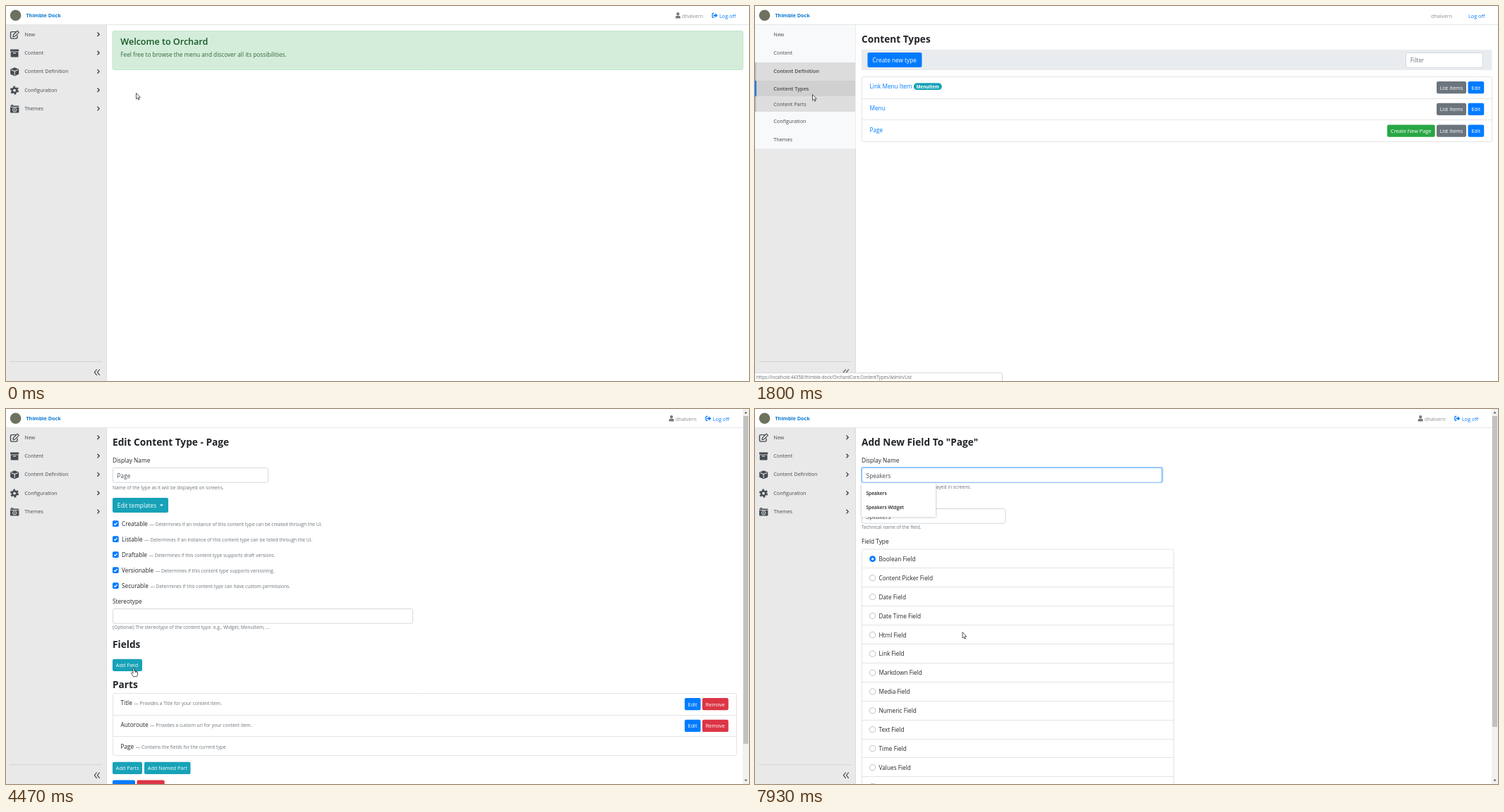
These frames come from a looping animation (1053x532 px, 8 s). An HTML page with a canvas:

```html
<!DOCTYPE html>
<html lang="en">
<head>
<meta charset="utf-8">
<title>Adding a field to a content type</title>
<style>
html, body { margin: 0; width: 100%; height: 100%; overflow: hidden; background: #fff; }
canvas { display: block; }
</style>
</head>
<body>
<canvas id="stage" width="1053" height="532"></canvas>
<script>
const c = document.getElementById('stage').getContext('2d');
const TICKS = 120, RATE = 15;            // the screen updates 15 times a second
const BODY = 8.28, SMALL = 7.28, HINT = 6.65;
const INK = '#212529', MUTED = '#6c757d', BLUE = '#007bff', TEAL = '#17a2b8',
  RED = '#dc3545', GREEN = '#28a745', ICON = '#454b51', LINE = '#e4e4e4';
const HOST = 'https://localhost:44358/thimble-dock/OrchardCore.ContentTypes/Admin/';

// y is the middle of the capital letters
function text(s, x, y, size = BODY, color = INK, weight = 400) {
  c.font = `${weight} ${size}px "Open Sans", "Noto Sans", sans-serif`;
  c.fillStyle = color;
  c.fillText(s, x, y + size * 0.357);
  return x + c.measureText(s).width;
}

function heading(s, y) {
  text(s, 151, y, 13.7, INK, 700);
}

function rect(x, y, w, h, color) {
  c.fillStyle = color;
  c.fillRect(x, y, w, h);
}

function box(x, y, w, h, fill, stroke, r = 2.2) {
  c.beginPath();
  c.roundRect(x, y, w, h, r);
  if (fill) { c.fillStyle = fill; c.fill(); }
  if (stroke) { c.strokeStyle = stroke; c.lineWidth = 1; c.stroke(); }
}

function shape(path, x, y, fill, stroke, width = 1) {
  const p = new Path2D(path);
  c.save();
  c.translate(x, y);
  if (fill) { c.fillStyle = fill; c.fill(p); }
  if (stroke) { c.strokeStyle = stroke; c.lineWidth = width; c.lineJoin = 'round'; c.stroke(p); }
  c.restore();
}

function dot(x, y, r, fill, stroke, width = 1) {
  c.beginPath();
  c.arc(x, y, r, 0, 7);
  if (fill) { c.fillStyle = fill; c.fill(); }
  if (stroke) { c.strokeStyle = stroke; c.lineWidth = width; c.stroke(); }
}

function button(s, x, y, w, color, pad = 4.8) {
  box(x, y, w, 17.3, color);
  text(s, x + pad, y + 9, SMALL, '#fff');
}

function input(x, y, w, focused) {
  if (focused) box(x - 1, y - 1, w + 2.5, 23, 'rgba(0,123,255,.36)', null, 3);
  box(x + .5, y + .5, w - 1, 20.7, '#fff', focused ? '#80bdff' : '#d4d9de');
}

function list(x, y, w, rows, step, h = rows * step) {
  box(x, y, w, h, '#fff', LINE);
  for (let i = 1; i < rows; i++) rect(x, Math.round(y + i * step - .5), w, 1, LINE);
}

const icons = [
  y => {
    shape('M3-4H-4Q-5.5-4-5.5-2.5V4Q-5.5 5.5-4 5.5H2.5Q4 5.5 4 4V1', 12, y, null, ICON, 1.4);
    shape('M-2 3L-1.6.4L4.2-5.4L6.4-3.2L.6 2.6Z', 12, y, '#e9e9e9', ICON, 1.2);
  },
  y => {
    box(6, y - 5.5, 12.2, 3, ICON, null, .6);
    box(6.7, y - 1.8, 10.8, 7.3, ICON, null, .6);
    rect(10, y - .6, 4, 1.1, '#e9e9e9');
  },
  y => {
    shape('M0-6L6-3.6V3.4L0 6L-6 3.4V-3.6Z', 12.2, y, ICON);
    shape('M-4.8-2.8L0-.9L4.8-2.8M0-.9V4.6', 12.2, y, null, '#e9e9e9', 1.1);
  },
  y => {
    c.setLineDash([2.7, 2.7]);
    dot(12, y, 5.1, null, ICON, 2);
    c.setLineDash([]);
    dot(12, y, 3.2, null, ICON, 2.6);
  },
  y => {
    box(6, y - 4.6, 12.4, 10.2, ICON, null, 1);
    rect(7, y - 5.8, 3.4, 1.2, ICON);
    rect(6, y - 2.9, 12.4, .8, '#e9e9e9');
    dot(12.2, y + 1.3, 2.7, null, '#e9e9e9', 1);
    dot(12.2, y + 1.3, .9, '#e9e9e9');
  }
];

function sidebar(o) {
  rect(0, 27, 142, 505, '#e9e9e9');
  rect(142, 27, 1, 505, '#dcdcdc');
  if (o.bare) rect(0, 27, 142.5, 131.5 + o.open, '#f8f9fa');
  const names = ['New', 'Content', 'Content Definition', 'Configuration', 'Themes'];
  names.forEach((name, i) => {
    const y = 40.2 + 26.35 * i + (i > 2 ? o.open : 0), chosen = i == 2 && o.chosen;
    if (i == 2 && (o.hoverRow || chosen)) rect(0, 80, 142, 26, '#dcdcdc');
    if (chosen) rect(0, 80, 1.5, 26, '#b5b8bb');
    text(name, 26.2, y, SMALL, ICON, chosen ? 600 : 400);
    if (o.bare) return;
    icons[i](y + .4);
    const down = i == 2 && o.open > 0;
    shape(down ? 'M-2.5-1.2L0 1.4L2.5-1.2' : 'M-1.3-2.8L1.4 0L-1.3 2.8', 130.8, y, null, '#343a40', 1.3);
  });
  if (o.open > 0) {
    c.save();
    c.beginPath();
    c.rect(0, 106, 142, o.open);
    c.clip();
    rect(0, 106, 142, 44, '#dedede');
    if (o.hoverSub || o.chosen) rect(0, 106, 142, 22, '#d0d0d0');
    if (o.chosen) {
      rect(0, 106, 2, 22, BLUE);
      rect(0, 128, 1.5, 22, '#b5b8bb');
    }
    text('Content Types', 26.2, 117.2, SMALL, ICON, o.chosen ? 600 : 400);
    text('Content Parts', 26.2, 139.2, SMALL, ICON);
    c.restore();
  }
  rect(5, 504, 131, 1, '#d3d3d3');
  shape('M-.3-4.2L-3.6 0L-.3 4.2M3.8-4.2L.5 0L3.8 4.2', 129, 519.7, null, ICON, 1.2);
}

function header(bare, dx) {
  rect(0, 26, 1053, 1, '#e3e5e8');
  dot(13.6, 13.3, 7.8, '#6d715f');
  text('Thimble Dock', 28.4, 13.6, SMALL, '#0a78d1', 700);
  text('dhalvern', 958 + dx, 14, SMALL, '#8a8d90');
  text('Log off', 1011 + dx, 14, SMALL, BLUE);
  if (bare) return;
  dot(952.3 + dx, 11.2, 2.1, '#777');
  shape('M-3.5 4V2.4Q-3.5.2-1.3.2H1.3Q3.5.2 3.5 2.4V4Z', 952.3 + dx, 13.5, '#777');
  shape('M-1-3H-2.4Q-3.4-3-3.4-2V2Q-3.4 3-2.4 3H-1', 1004.5 + dx, 13.4, null, BLUE, 1.2);
  shape('M-1.8-1H.8V-3.2L4 0L.8 3.2V1H-1.8Z', 1004.5 + dx, 13.4, BLUE);
}

function scrollbar(end) {
  rect(1044, 0, 9, 532, '#f1f1f1');
  rect(1045, 10, 7, end - 10, '#c1c1c1');
  shape('M-2 1.2L0-1.2L2 1.2Z', 1048.5, 5, '#505050');
  shape('M-2-1.2L0 1.2L2-1.2Z', 1048.5, 527, '#505050');
}

function welcomePage() {
  box(151, 35.5, 893.5, 55, '#d4edda', '#c3e6cb');
  text('Welcome to Orchard', 162.3, 51, 12.55, '#155724', 600);
  text('Feel free to browse the menu and discover all its possibilities.', 162.3, 69.2, BODY, '#31683d');
}

function typesPage(n) {
  heading('Content Types', 47);
  rect(151, 62, 893.5, 29, '#e9ecef');
  box(159.5, 66, 77, 21, BLUE);
  text('Create new type', 166.6, 77, BODY, '#fff');
  input(922, 66, 110, n >= 28);
  text('Filter', 928.8, 77, BODY, MUTED);
  list(151.5, 100.5, 893, 3, 30.7);
  const end = text('Link Menu Item', 162.5, 114.2, BODY, BLUE);
  box(end + 2.5, 109.3, 40, 9.8, TEAL, null, 5);
  text('MenuItem', end + 6.3, 114.3, 6.2, '#fff', 700);
  text('Menu', 162.5, 145, BODY, BLUE);
  const over = n >= 33, link = over ? '#0056b3' : BLUE;
  const stop = text('Page', 162.5, 175.7, BODY, link);
  if (over) rect(162.5, 179.6, stop - 162.5, .8, link);
  for (let i = 0; i < 3; i++) {
    const y = 107 + 30.75 * i;
    button('List Items', 966, y, 42, MUTED);
    button('Edit', 1010.5, y, 22.7, BLUE);
  }
  button('Create New Page', 896, 168.5, 67.7, GREEN);
}

function described(name, note, x, y) {
  const end = text(name, x, y);
  text('— ' + note, end + 2.4, y + .5, HINT, MUTED);
}

function editPage() {
  heading('Edit Content Type - Page', 47);
  text('Display Name', 151, 73);
  input(151, 83, 221);
  text('Page', 157.6, 95, BODY, '#495057');
  text('Name of the type as it will be displayed on screens.', 151, 112, HINT, MUTED);
  box(151, 126, 79, 21, TEAL);
  text('Edit templates', 157.8, 137, BODY, '#fff');
  shape('M-2.5-1.2H2.5L0 1.4Z', 220.5, 136.6, '#fff');
  [
    ['Creatable', 'Determines if an instance of this content type can be created through the UI.'],
    ['Listable', 'Determines if an instance of this content type can be listed through the UI.'],
    ['Draftable', 'Determines if this content type supports draft versions.'],
    ['Versionable', 'Determines if this content type supports versioning.'],
    ['Securable', 'Determines if this content type can have custom permissions.']
  ].forEach(([name, note], i) => {
    const y = 162.7 + 22 * i;
    box(151, y - 4.4, 8.7, 8.7, BLUE, null, 1.8);
    shape('M-2.2.1L-.7 1.6L2.2-1.7', 155.3, y, null, '#fff', 1.2);
    described(name, note, 164, y);
  });
  text('Stereotype', 151, 273);
  input(151, 283, 426);
  text('(Optional) The stereotype of the content type. e.g., Widget, MenuItem, ...', 151, 310, HINT, MUTED);
  heading('Fields', 333.7);
  button('Add Field', 151, 354.7, 42, TEAL);
  heading('Parts', 391);
  list(151.5, 403.5, 884, 3, 30.5, 88);
  [
    ['Title', 'Provides a Title for your content item.'],
    ['Autoroute', 'Provides a custom url for your content item.'],
    ['Page', 'Contains the fields for the current type']
  ].forEach(([name, note], i) => {
    const y = 410 + 30.8 * i;
    described(name, note, 162.5, y + 7.5);
    if (i == 2) return;
    button('Edit', 961.8, y, 22.7, BLUE);
    button('Remove', 986.8, y, 37, RED);
  });
  button('Add Parts', 151, 500.8, 42, TEAL);
  button('Add Named Part', 196, 500.8, 65.5, TEAL);
  box(151, 526.5, 32, 20, BLUE);
  box(185.5, 526.5, 39.2, 20, RED);
  scrollbar(475);
}

const typedAt = [89, 91, 93, 99, 102, 104, 107, 108];
const hints = ['Speakers', 'Speaker', 'Speakers Widget', 'Summary', 'Subtitle', 'Section'];
const fields = ['Boolean', 'Content Picker', 'Date', 'Date Time', 'Html', 'Link',
  'Markdown', 'Media', 'Numeric', 'Text', 'Time', 'Values', 'Video'];

function fieldPage(n) {
  const value = 'Speakers'.slice(0, typedAt.filter(k => n >= k).length);
  heading('Add New Field To "Page"', 47);
  text('Display Name', 151, 73);
  input(151, 83, 426, n >= 76);
  const end = text(value, 157.6, 95, BODY, '#495057');
  if (n >= 83 && n < 114) rect(end + .2, 89.3, .8, 10, '#222');
  text('Name of the field as it will be displayed in screens.', 151, 110.2, HINT, MUTED);
  text('Technical Name', 151, 130.7);
  input(151, 141, 204.5);
  text(value, 157.6, 152.6, BODY, '#495057');
  text('Technical name of the field.', 151, 168, HINT, MUTED);
  text('Field Type', 151, 188.3);
  list(151.5, 199, 442, fields.length, 26.9);
  fields.forEach((name, i) => {
    const y = 212.7 + 26.9 * i;
    if (i) dot(166.6, y, 4.1, '#fff', '#b3bac1', .9);
    else {
      dot(166.6, y, 4.4, BLUE);
      dot(166.6, y, 1.7, '#fff');
    }
    text(name + ' Field', 175.5, y + .3);
  });
  scrollbar(451);
  if (value) suggestions(n < 91 ? hints : n < 109 ? hints.slice(0, 3) : [hints[0], hints[2]]);
}

function suggestions(items) {
  c.save();
  c.shadowColor = 'rgba(0,0,0,.35)';
  c.shadowBlur = 3;
  c.shadowOffsetY = 1;
  rect(151, 105, 105, 8.8 + 19.8 * items.length, '#fff');
  c.restore();
  items.forEach((s, i) => text(s, 157.4, 119.6 + 19.8 * i, 6.7, '#222', 600));
}

function status(s) {
  box(-2, 520.5, 352.5, 14, '#fff', '#d4d6d9');
  text(s, 2, 526.7, 6.2, '#666a6e');
}

// pointer tip: tick, x, y
const path = [
  [0, 184, 123], [1, 182, 122], [8, 85, 95], [15, 85, 95], [20, 81, 125], [27, 81, 125],
  [29, 150, 205], [31, 236, 240], [34, 177, 175.5], [42, 177, 175.5], [47, 250, 246],
  [60, 176, 376], [62, 179, 379], [66, 179, 379], [67, 181, 367], [71, 181, 367],
  [74, 302, 344.5], [76, 315, 335], [79, 282, 198], [83, 240, 108], [113, 240, 108],
  [115, 330, 150], [117, 375, 225], [119, 293.5, 316], [TICKS, 293.5, 316]
];

function pointer(n) {
  const i = path.findIndex((p, k) => k && n <= p[0]);
  const [t0, x0, y0] = path[i - 1], [t1, x1, y1] = path[i];
  const k = (n - t0) / (t1 - t0), u = k * k * (3 - 2 * k);
  const x = x0 + (x1 - x0) * u, y = y0 + (y1 - y0) * u;
  const hand = n >= 6 && n < 27 || n >= 33 && n < 42 || n >= 67 && n < 73;
  shape(hand
    ? 'M-1 1C-1-.3.9-.3.9 1V4.5L4 5.2Q5.5 5.6 5.5 7V9Q5.4 11 4.5 12.6H-.6Q-1.6 10.8-3.3 8.3Q-3.7 7-2.4 7L-1 8ZM2.4 5V7M4 5.4V7.2'
    : 'M.5.5V9L2.4 7.3L3.8 10.2L5 9.6L3.7 6.8H6.3Z', x, y, '#fff', '#222', .75);
}

function draw(n) {
  const page = n < 26 ? 0 : n < 40 ? 1 : n < 73 ? 2 : 3;
  const bare = [26, 40, 73].some(k => n >= k && n < k + 3);
  const grow = Math.min(1, Math.max(0, (n - 11) / 6));
  rect(0, 0, 1053, 532, '#fff');
  header(bare, page > 1 ? -9.2 : 0);
  sidebar({
    bare,
    open: page > 1 ? 0 : 44 * grow * grow * (3 - 2 * grow),
    chosen: page == 1,
    hoverRow: n >= 6 && n < 18,
    hoverSub: n >= 18
  });
  [welcomePage, typesPage, editPage, fieldPage][page](n);
  if (n >= 19 && n < 30) status(HOST + 'List');
  if (n >= 39 && n < 50) status(HOST + 'Edit/Page?returnUrl=%2Fthimble-dock%2FOrch...');
  if (n >= 70 && n < 78) status(HOST + 'AddFieldTo/Page?returnUrl=%2Fthimble-doc...');
  pointer(n);
}

// the small lead keeps times rounded to 10 ms on the right tick
function loop() {
  draw(Math.floor(performance.now() * RATE / 1000 + .1) % TICKS);
  requestAnimationFrame(loop);
}
loop();
</script>
</body>
</html>
```
